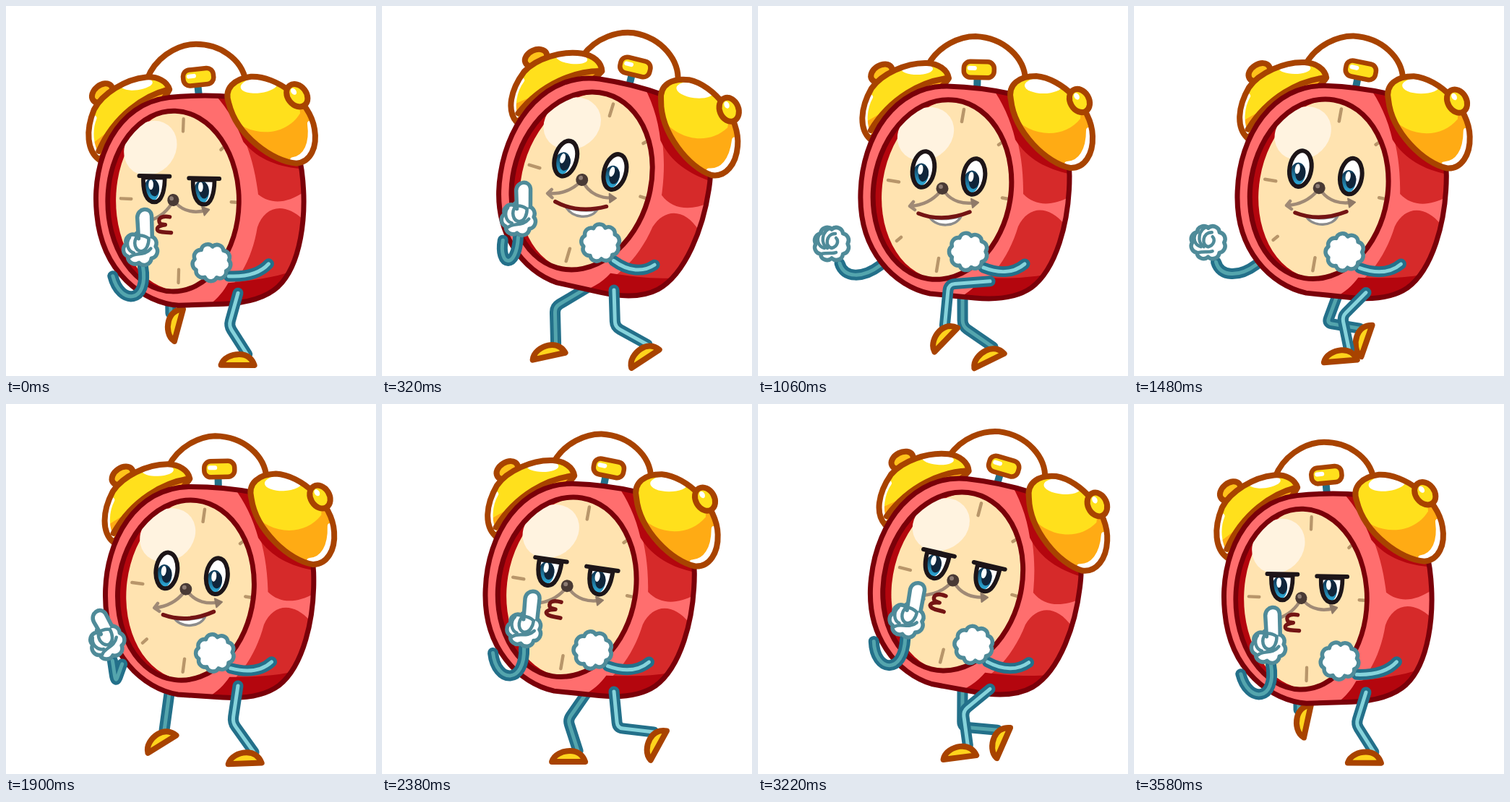
An HTML page for the animation above (3600 ms loop, 512 by 512 pixels).

```html
<!DOCTYPE html>
<html lang="en">
<head>
<meta charset="utf-8">
<title>Alarm clock</title>
<style>
  html, body { margin: 0; width: 100%; height: 100%; overflow: hidden; background: #fff; }
  svg { display: block; width: 100vw; height: 100vh; }
  path, ellipse, circle { stroke-linecap: round; stroke-linejoin: round; }
  .none { fill: none; }
  .brass { stroke: #a84300; stroke-width: 8; }
  .maroon { stroke: #7a0009; stroke-width: 7; }
  .tick { stroke: #b8966a; stroke-width: 4.5; fill: none; }
  .wand { stroke: #a08a76; stroke-width: 4.5; fill: none; }
  .ink { stroke: #1d1518; stroke-width: 6; }
  .glove { fill: #fff; stroke: #4f8b99; stroke-width: 5.5; }
  .crease { fill: none; stroke: #4f8b99; stroke-width: 4.5; }
  .lip { fill: none; stroke: #741414; stroke-width: 5.5; }
  .tube { fill: none; stroke: #23708a; stroke-width: 15; }
  .shine { fill: none; stroke: #86d3db; stroke-width: 5; }
  .dim { stroke: #54a5ad; }
</style>
</head>
<body>
<svg viewBox="0 0 512 512">
  <defs>
    <linearGradient id="iris" x1="0" y1="0" x2="0" y2="1">
      <stop offset=".2" stop-color="#10405f"/>
      <stop offset="1" stop-color="#2fb4e4"/>
    </linearGradient>
    <path id="shell" d="M262 111C300 112 330 117 352 122C400 140 431 190 431 235C431 300 412 365 378 390C355 406 322 406 300 404C280 402 258 400 238 398C190 388 139 340 142 258C144 180 190 110 262 111Z"/>
    <path id="domeR" d="M350 130C345 108 362 97 385 97C420 100 462 140 463 180C464 205 452 225 432 224C400 218 355 175 350 130Z"/>
    <path id="domeL" d="M155 184C140 170 141 142 157 114C171 94 205 78 234 79C250 80 262 88 264 100C250 122 200 150 155 184Z"/>
    <ellipse id="rim" rx="95" ry="125" transform="translate(255 254) rotate(9)"/>
    <path id="half" d="M-15 -9C-16 12 -10 25 1 25C11 25 16 10 16 -9Z"/>
    <ellipse id="full" rx="15" ry="25"/>
    <clipPath id="inShell"><use href="#shell"/></clipPath>
    <clipPath id="inDomeR"><use href="#domeR"/></clipPath>
    <clipPath id="inDomeL"><use href="#domeL"/></clipPath>
    <clipPath id="inRim"><use href="#rim"/></clipPath>
    <clipPath id="inHalf"><use href="#half"/></clipPath>
    <clipPath id="inFull"><use href="#full"/></clipPath>
    <g id="pupil">
      <ellipse cx="-3" cy="8" rx="11" ry="16" fill="url(#iris)"/>
      <ellipse cx="1" cy="6" rx="7" ry="11" fill="#10253b"/>
      <ellipse cx="-4" cy="1" rx="3.5" ry="7" fill="#fff"/>
    </g>
    <g id="eyeOpen">
      <use href="#full" fill="#fff"/>
      <use href="#pupil" clip-path="url(#inFull)"/>
      <use href="#full" class="ink none"/>
    </g>
    <g id="eyeHalf">
      <use href="#half" fill="#fff"/>
      <use href="#pupil" clip-path="url(#inHalf)"/>
      <use href="#half" class="ink none"/>
      <path class="ink" d="M-21 -11H23"/>
    </g>
    <g id="shoe">
      <path class="brass" d="M-23 6C-20 -4 -8 -9 2 -9C13 -9 20 -3 23 6Z" fill="#ffd41c"/>
    </g>
  </defs>

  <g id="backLeg"></g>
  <g id="rearBody">
    <path class="brass none" d="M235 82C250 54 280 42 301 42C341 44 369 72 370 102"/>
    <g id="hammer">
      <path d="M305 116V100" stroke="#23708a" stroke-width="10"/>
      <rect x="286" y="77" width="42" height="22" rx="9" fill="#ffe01c" stroke="#a84300" stroke-width="6.5"/>
      <path d="M294 86H301" stroke="#fff" stroke-width="6"/>
    </g>
    <ellipse class="brass" cx="171" cy="93" rx="16" ry="11" transform="rotate(-32 171 93)" fill="#ffc21a"/>
    <g clip-path="url(#inDomeL)">
      <use href="#domeL" fill="#ffe01c"/>
      <path d="M140 165C170 150 215 118 272 88V200H140Z" fill="#ffab14"/>
      <ellipse cx="220" cy="87" rx="22" ry="8" fill="#fff"/>
      <path class="none" d="M154 180C144 164 147 140 155 126" stroke="#fff" stroke-width="8"/>
    </g>
    <path class="brass none" stroke-width="6" d="M262 100C228 104 184 126 156 172"/>
    <use href="#domeL" class="brass none"/>
    <g id="armOut"></g>
  </g>

  <g id="body">
    <g clip-path="url(#inShell)">
      <use href="#shell" fill="#ff6e6e"/>
      <path d="M318 105C350 142 368 195 367 260C385 279 412 277 440 259V105Z" fill="#d62a2a"/>
      <path d="M318 105C336 128 349 155 356 185C375 215 405 228 440 234V105Z" fill="#b4060e"/>
      <path d="M360 305C374 276 402 275 424 302V410H270C315 390 345 355 360 305Z" fill="#d62a2a"/>
      <path d="M310 376C345 377 370 377 402 371L390 412H260C285 403 300 390 310 376Z" fill="#b4060e"/>
    </g>
    <use href="#shell" class="maroon none"/>
    <g id="face">
      <g clip-path="url(#inRim)">
        <use href="#rim" fill="#b4060e"/>
        <ellipse rx="92" ry="125" transform="translate(264 254) rotate(9)" fill="#ffe3b0"/>
        <ellipse rx="41" ry="35" transform="translate(232 177) rotate(-35)" fill="#fff3e0"/>
        <path class="tick" d="M285 143L282 160M250 349L247 367M180 241L195 243.500M338 265.500L346 267M333 192L340 187M192 325L198 320"/>
      </g>
      <use href="#rim" class="maroon none"/>
      <path class="wand" d="M252 257C240 271 225 276 211 277M215 271L210 277L217 282M259 258C268 270 284 275 301 272"/>
      <path d="M295 267L305 272L297 279Z" fill="#8f7a68" stroke="#8f7a68" stroke-width="2"/>
      <circle cx="255" cy="252.500" r="8.500" fill="#493a35"/>
      <circle cx="253" cy="250" r="3" fill="#8d7c74"/>
      <g id="smile">
        <use href="#eyeOpen" transform="translate(229 226) rotate(9)"/>
        <use href="#eyeOpen" transform="translate(299 236) rotate(9)"/>
        <path d="M238 293Q258 297 281 291C274 306 248 307 238 293Z" fill="#fff" stroke="#8c8c8c" stroke-width="3.500"/>
        <path class="lip" d="M222 287Q255 300 293 285"/>
      </g>
      <g id="smirk">
        <use href="#eyeHalf" transform="translate(230 227) rotate(8)"/>
        <use href="#eyeHalf" transform="translate(301 239) rotate(8)"/>
        <path class="lip" d="M247 275C234 271 228 276 232 283L239 285C228 285 223 289 229 293C235 296 240 295 246 297"/>
      </g>
    </g>
    <g id="bellR">
      <g clip-path="url(#inDomeR)">
        <use href="#domeR" fill="#ffab14"/>
        <path d="M340 135C365 182 420 188 446 156L450 90H340Z" fill="#ffe01c"/>
        <ellipse cx="395" cy="110" rx="26" ry="11" fill="#fff"/>
        <path class="none" d="M458 172C458 200 447 218 428 219" stroke="#fff" stroke-width="8"/>
      </g>
      <use href="#domeR" class="brass none"/>
      <ellipse class="brass" cx="445" cy="131" rx="13" ry="17" transform="rotate(-30 445 131)" fill="#ffe01c"/>
      <ellipse cx="441" cy="125" rx="3.500" ry="5" transform="rotate(-30 441 125)" fill="#fff"/>
    </g>
  </g>

  <g id="frontLeg"></g>
  <g id="frontBody">
    <g id="armUp"></g>
    <g id="armR"></g>
  </g>
</svg>
<script>
const LOOP = 3600, WALK = 1800, SWAY = 900, FRONT_LEAD = 800;
const $ = id => document.getElementById(id);
const set = (id, value) => $(id).setAttribute('transform', value);
const mix = (a, b, k) => a + (b - a) * k;
const smooth = k => { k = Math.min(1, Math.max(0, k)); return k * k * (3 - 2 * k); };
const wave = (t, peak) => Math.cos((t - peak) / SWAY * 2 * Math.PI);

// One stride shared by both legs: time, ankle x from hip, ankle y, shoe angle, hip y.
const stride = [
  [0, -55, 425, -75, 380],
  [100, -64, 451, -32, 382],
  [580, -12, 480, 0, 400],
  [730, 6, 481, 0, 402],
  [900, 22, 482, -2, 390],
  [1060, 42, 472, -26, 392],
  [1380, 55, 454, -61, 398],
  [1460, 36, 448, -70, 397],
  [1720, -53, 425, -75, 382]
];

// Smooth periodic curve through the stride.
function footAt(t) {
  const n = stride.length;
  const at = i => {
    const turn = Math.floor(i / n), [time, ...pose] = stride[i - turn * n];
    return [time + turn * WALK, ...pose];
  };
  const i = stride.findLastIndex(s => s[0] <= t);
  const [p, a, b, q] = [-1, 0, 1, 2].map(o => at(i + o));
  const d = b[0] - a[0], k = (t - a[0]) / d, e = 1 - k;
  return [1, 2, 3, 4].map(c => {
    const m0 = (b[c] - p[c]) / (b[0] - p[0]) * d;
    const m1 = (q[c] - a[c]) / (q[0] - a[0]) * d;
    return mix(a[c], b[c], smooth(k)) + k * e * (e * m0 - k * m1);
  });
}

// Stays upright for a moment on the way between the two leaning poses.
function leanAt(beat) {
  const p = beat % (SWAY / 2);
  const v = smooth(p / 150) + smooth((p - 230) / 130) - 1;
  return beat < SWAY / 2 ? v : -v;
}

const tube = (d, dim = '') => `<path class="tube" d="${d}"/><path class="shine ${dim}" d="${d}"/>`;

// The knee bows forward from the middle of the leg, more when the foot is lifted.
function leg(id, hipX, t, dim) {
  const [dx, ay, turn, hy] = footAt(t % WALK);
  const ax = hipX + dx, dy = ay - hy, len = Math.hypot(dx, dy);
  const bow = (20 + (480 - ay) * .45) / len;
  const kx = hipX + dx / 2 - dy * bow, ky = hy + dy / 2 + dx * bow;
  const near = (x, y) => `${mix(kx, x, .15)} ${mix(ky, y, .15)}`;
  const d = `M${hipX} ${hy}L${near(hipX, hy)}Q${kx} ${ky} ${near(ax, ay)}L${ax} ${ay}`;
  $(id).innerHTML = tube(d, dim) +
    `<use href="#shoe" transform="translate(${ax} ${ay}) rotate(${turn}) translate(-13 9)"/>`;
}

// Closed ring of round lobes.
function puff(n, rx, ry) {
  const r = .55 * 2 * rx * Math.sin(Math.PI / n);
  let d = '';
  for (let i = 0; i < n; i++) {
    const a = i / n * 2 * Math.PI;
    d += `${i ? `A${r} ${r} 0 0 1 ` : 'M'}${rx * Math.cos(a)} ${ry * Math.sin(a)}`;
  }
  return `<path class="glove" d="${d}A${r} ${r} 0 0 1 ${rx} 0Z"/>`;
}

const fist = puff(9, 24, 22);
const curled = puff(8, 22, 20) +
  '<path class="crease" d="M-14 -17C-24 -6 -18 4 -10 6M-1 -22C-14 -18 -16 0 -6 6M5 -14C-8 -14 -10 4 0 6C8 4 10 -4 6 -8M-14 14C-6 12 2 14 6 12"/>';
const pointing = len => {
  const base = mix(-26, -43, len), tip = base - 13;
  return puff(7, 21, 20) +
    `<path class="glove" d="M-1 -14L1 ${base}C3 ${tip} 21 ${tip} 21 ${base}L18 -14"/>
    <path class="crease" d="M-13 -17C-20 -10 -18 2 -10 5M-2 -18C-10 -10 -8 2 0 4C8 4 12 -4 13 -12C8 -17 2 -18 -2 -18M-16 10C-8 4 4 12 14 2"/>`;
};

const outArm = [113, 356, 119, 377, 145, 377, 169, 359];
const upArm = [196, 338, 198, 390, 158, 388, 153, 346];

function leftArm(t) {
  const up = 1 - smooth((t - 250) / 230) + smooth((t - 1810) / 200);
  const p = outArm.map((v, i) => mix(v, upArm[i], up));
  const raised = up > .25;
  const pose = `translate(${mix(102, 196, up)} ${mix(329, 313, up)}) rotate(${raised ? mix(-60, 0, up) : 0})`;
  const art = tube(`M${p[0]} ${p[1]}C${p.slice(2).join(' ')}`, 'dim') +
    `<g transform="${pose}">${raised ? pointing(up) : curled}</g>`;
  $('armUp').innerHTML = raised ? art : '';
  $('armOut').innerHTML = raised ? '' : art;
}

function rightArm(beat) {
  const y = 341 + 5 * wave(beat, 805);
  $('armR').innerHTML = tube(`M369 357C355 369 335 371 312 ${y + 22}`) +
    `<g transform="translate(291 ${y})">${fist}</g>`;
}

function draw(t) {
  const beat = t % SWAY, lean = leanAt(beat), left = Math.min(lean, 0);
  const pose = `translate(${-3 * left} 0) rotate(${lean * (lean < 0 ? 7.4 : 9)} 363 423)`;
  for (const id of ['rearBody', 'body', 'frontBody']) set(id, pose);
  set('face', `translate(130 0) scale(${1 + .045 * left} 1) translate(-130 0)`);
  set('bellR', `translate(${7 * left} 0)`);
  set('hammer', `translate(-2 0) rotate(${6 - 5.5 * wave(beat, 80)} 304 122)`);

  const happy = t >= 300 && t < 1990;
  $('smile').style.display = happy ? '' : 'none';
  $('smirk').style.display = happy ? 'none' : '';

  leg('backLeg', 283, t, 'dim');
  leg('frontLeg', 321, t + FRONT_LEAD, '');
  leftArm(t);
  rightArm(beat);
}

const start = performance.now();
function tick() {
  draw((performance.now() - start) % LOOP);
  requestAnimationFrame(tick);
}
tick();
</script>
</body>
</html>
```
